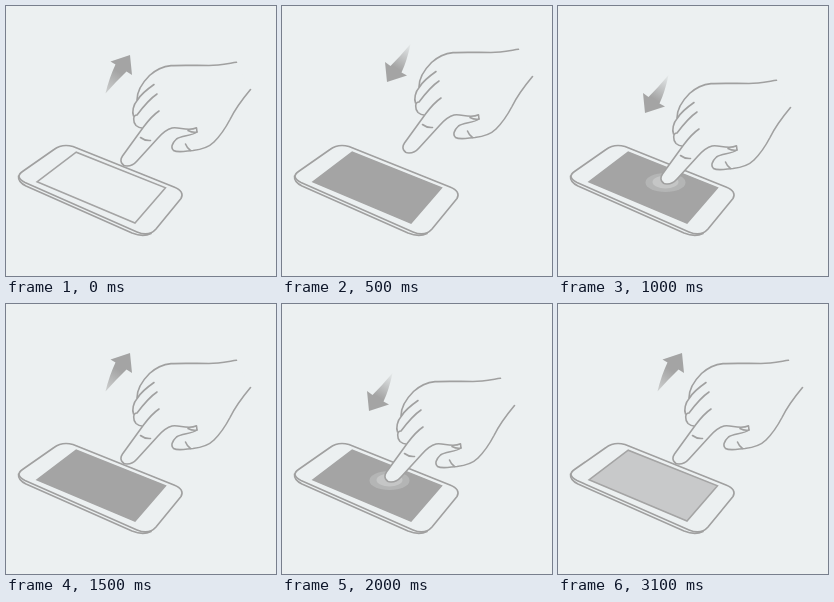
Write an HTML page that moves like this. It is 270 by 270 pixels and loops after 3.5 s.

```html
<!DOCTYPE html>
<html lang="en">
<head>
<meta charset="utf-8">
<title>Tap to wake</title>
<style>
html, body { margin: 0; width: 100%; height: 100%; overflow: hidden; background: #ecf0f1; }
svg { display: block; width: 100vw; height: 100vh; }
.line { fill: none; stroke: #a0a0a0; stroke-width: 1.6; stroke-linecap: round; stroke-linejoin: round; }
.paper { fill: #ecf0f1; }
.hand, .screen, .up, .down, .ripple { animation: 3500ms step-end infinite; }
.hand { animation-name: hand; }
.screen { animation-name: screen; stroke: #a4a4a4; stroke-width: 1.5; stroke-linejoin: miter; }
.up { animation-name: up; }
.down { animation-name: down; }
.ripple { animation-name: ripple; }

@keyframes hand {
  0%, 42.8571%, 71.4285% { transform: translate(0, 0); }
  14.2857% { transform: translate(6px, -13px); }
  28.5714%, 57.1428% { transform: translate(-12px, 18px); }
}
@keyframes screen {
  0% { fill: #ecf0f1; }
  14.2857% { fill: #a4a4a4; }
  71.4285% { fill: #c8c9ca; }
}
@keyframes up {
  0%, 42.8571%, 71.4285% { opacity: 1; }
  14.2857%, 57.1428% { opacity: 0; }
}
@keyframes down {
  0%, 42.8571%, 71.4285% { opacity: 0; transform: translate(0, 0); }
  14.2857% { opacity: 1; transform: translate(0, 0); }
  28.5714%, 57.1428% { opacity: 1; transform: translate(-18px, 31px); }
}
@keyframes ripple {
  0%, 42.8571%, 71.4285% { opacity: 0; }
  28.5714%, 57.1428% { opacity: 1; }
}
</style>
</head>
<body>
<svg viewBox="0 0 270 270">
  <defs>
    <linearGradient id="rise" gradientUnits="userSpaceOnUse" x1="120" y1="54" x2="99" y2="88">
      <stop offset=".35" stop-color="#a4a4a4"/>
      <stop offset="1" stop-color="#d0d2d2"/>
    </linearGradient>
    <linearGradient id="fall" gradientUnits="userSpaceOnUse" x1="108" y1="72" x2="128" y2="38">
      <stop offset=".3" stop-color="#a4a4a4"/>
      <stop offset="1" stop-color="#e6eaeb"/>
    </linearGradient>
  </defs>

  <!-- phone -->
  <path class="line" d="M12.5 170 C12 174.500 15 177.500 20 180 L126 227 Q137 231.500 145 227.500"/>
  <path class="line paper" d="M16.500 165.500 L48 143.500 Q56 137.500 67 140.500 L168 181 Q179 185.500 175 192.500
    L150 223 Q143 231 131 226 L19 176.500 Q8.500 171 16.500 165.500 Z"/>
  <path class="line screen" d="M31 175.800 L70.200 146.200 L159.500 181.700 L129 217 Z"/>

  <g class="ripple">
    <ellipse cx="107.500" cy="176.500" rx="20" ry="9.500" fill="#b4b5b5"/>
    <ellipse cx="107.500" cy="176" rx="13" ry="6.500" fill="#c5c6c6"/>
  </g>

  <!-- hand -->
  <g class="hand">
    <path class="paper" d="M230.500 56.300 C213 59.500 184 59 164 60 C147 63 138 73 131 94
      C126 102 125.500 111 130 119.500 L137 122
      L116.500 150 C113 155 116 160 121 160 C125 160 128 158.500 131 155
      L152 132 L162 123.500 L166 136 Q167 144 187 144.500 Q200 143 208 136 L224 113.500 L244.500 83.500 Z"/>
    <g class="line">
      <path d="M230.500 56.300 C222 57.500 213 59.300 203 59.500 C190 59.500 177 59 165 59.600 C156 60.500 149 64.500 143.500 69.500 C136 77 131 86 131 94"/>
      <path d="M148 78.500 C143 82 135 88 131.500 94 C127 99 126 106 127.500 110"/>
      <path d="M151 88 C145 92 137 101 131 109 C126.500 109 127 116 130 119.500 Q133 122 136 122"/>
      <path d="M153 105 C147 109 142 115 137.500 121 L116.500 150 C113 155 116 160 121 160
        C125 160 128 158.500 131 155 L152 132 C156 127.500 160 123.500 166 122
        C173 120.500 182 126 190.500 121.800 L191 126 C186 130 175 129.500 170.500 133
        C166 137 164.500 142 167.500 144.500 C172 147 180 145 187 144.500
        C196 143.500 203 141 208 136 C214 130 219 123 224 113.500 C230 101 237 92.500 244.500 83.500"/>
      <path d="M191 126 Q187 127 182 124.500"/>
      <path d="M179.500 138 Q181 142 184.500 144.500"/>
      <path d="M134.500 131.500 Q139 135 144.500 134.500"/>
    </g>
  </g>

  <!-- direction arrows -->
  <path class="up" fill="url(#rise)" d="M124 49 L104.500 55.500 L109.500 58.500 Q103.500 71 99.500 87.500 Q110 75.500 120.500 65.500 L126 69 Z"/>
  <path class="down" fill="url(#fall)" d="M105 76 L103 56 L108.500 60 Q118.500 50 128.500 38 Q125 55 119.500 66.500 L125 69.500 Z"/>
</svg>
</body>
</html>
```
